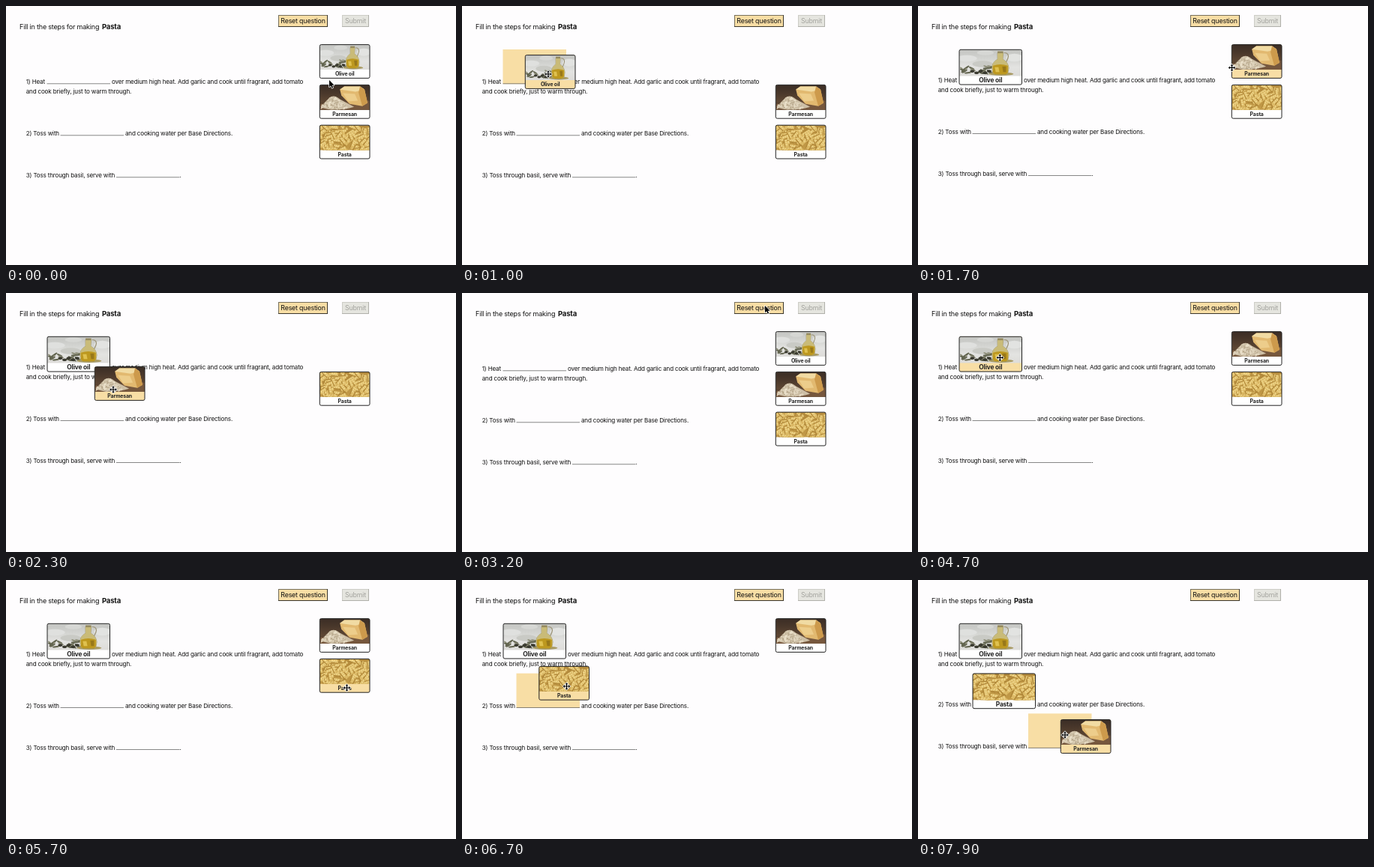
Recreate the animation shown at these times as an HTML page with a canvas. Size 600 by 346 pixels, loop 8000 ms.

```html
<!DOCTYPE html>
<html lang="en">
<head>
<meta charset="utf-8">
<title>Fill in the steps</title>
<style>
  html, body { margin: 0; width: 100%; height: 100%; overflow: hidden; background: #fefdfe; }
  canvas { display: block; width: 600px; height: 346px; }
</style>
</head>
<body>
<canvas></canvas>
<script>
const LOOP = 8000, STEP = 100;
const YELLOW = '#f8dea5', INK = '#111';
const CARD = { w: 66.7, h: 44.8 }, SLOT = { w: 84.5, h: 46.2 };
const FILL_SHIFT = 2.3; // a filled slot lifts its own text and everything below

const canvas = document.querySelector('canvas');
const ctx = canvas.getContext('2d');
const ratio = window.devicePixelRatio || 1;
canvas.width = 600 * ratio;
canvas.height = 346 * ratio;
ctx.scale(ratio, ratio);

const cards = [
  { name: 'Olive oil', paint: paintOil },
  { name: 'Parmesan', paint: paintCheese },
  { name: 'Pasta', paint: paintPasta },
];

const rows = [
  { before: '1) Heat', after: 'over medium high heat. Add garlic and cook until fragrant, add tomato',
    next: 'and cook briefly, just to warm through.', x: 54.5, afterX: 141, y: 104.2 },
  { before: '2) Toss with', after: 'and cooking water per Base Directions.', x: 72.5, afterX: 159, y: 173.2 },
  { before: '3) Toss through basil, serve with', after: '.', x: 147, afterX: 231.5, y: 229.2 },
];

const RESET = 3100;
const drags = [
  { card: 0, slot: 0, grab: 300, drop: 1200, end: RESET },
  { card: 1, slot: 1, grab: 1900, drop: 2500, end: RESET },
  { card: 0, slot: 0, grab: 3900, drop: 4600, end: LOOP },
  { card: 2, slot: 1, grab: 5900, drop: 6800, end: LOOP },
  { card: 1, slot: 2, grab: 7400, drop: LOOP, end: LOOP },
];

// Pointer path: time, x, y
const path = [
  [0, 431, 99], [100, 431, 99], [300, 449, 77], [1000, 115, 91], [1200, 113, 88],
  [1800, 443, 82], [1900, 443, 82], [2300, 143, 129], [2500, 120, 148],
  [2900, 404, 17], [3200, 404, 17], [3500, 414, 6], [3700, 414, 12],
  [3900, 433, 67], [4100, 208, 68], [4400, 98, 84], [4600, 97, 84],
  [5500, 455, 152], [5700, 454.5, 144], [5900, 455, 132], [6400, 132, 145],
  [6700, 139.5, 142], [6800, 139.5, 142], [7300, 424, 72], [7400, 424, 72],
  [7800, 198, 209], [7900, 196, 207], [8000, 196, 207],
];

function pointerAt(t) {
  const i = Math.max(1, path.findIndex(p => p[0] >= t));
  const [t0, x0, y0] = path[i - 1], [t1, x1, y1] = path[i];
  const k = (t - t0) / (t1 - t0), e = k * k * (3 - 2 * k);
  return { x: x0 + (x1 - x0) * e, y: y0 + (y1 - y0) * e };
}

const inside = (p, r) => p.x >= r.x && p.x <= r.x + r.w && p.y >= r.y && p.y <= r.y + r.h;

function text(str, x, y, size, { bold = false, color = INK, align = 'left' } = {}) {
  ctx.font = `${bold ? 700 : 400} ${size}px Inter, sans-serif`;
  ctx.letterSpacing = `${-0.02 * size}px`;
  ctx.fillStyle = color;
  ctx.textAlign = align;
  ctx.fillText(str, x, y);
}

function rect(x, y, w, h, color) {
  ctx.fillStyle = color;
  ctx.fillRect(x, y, w, h);
}

function ellipse(x, y, rx, ry, color, turn = 0) {
  ctx.fillStyle = color;
  ctx.beginPath();
  ctx.ellipse(x, y, rx, ry, turn, 0, 7);
  ctx.fill();
}

function shape(d, fill, stroke, width = 1) {
  const p = new Path2D(d);
  if (stroke) {
    ctx.strokeStyle = stroke;
    ctx.lineWidth = width;
    ctx.stroke(p);
  }
  if (fill) {
    ctx.fillStyle = fill;
    ctx.fill(p);
  }
}

function randomizer(seed) {
  return () => (seed = (seed * 16807) % 2147483647) / 2147483647;
}

function backdrop(...colors) {
  const g = ctx.createLinearGradient(0, 0, 0, 33);
  colors.forEach((c, i) => g.addColorStop(i / (colors.length - 1), c));
  rect(0, 0, 67, 34, g);
}

// Pictures are painted in a 67 by 33 box.
function paintOil() {
  backdrop('#c3c4c1', '#d2d3d0', '#e3e3e1', '#dddcd9');
  ellipse(8, 11, 11, 4, '#dfe0de');
  ellipse(28, 4, 9, 3, '#d6d7d4');
  ellipse(59, 10, 9, 5, '#e2e3e1');
  ellipse(25, 18, 11, 4, '#c9cac5');
  const rnd = randomizer(41);
  for (let i = 0; i < 26; i++) {
    const x = 3 + rnd() * 32, y = 21 + rnd() * 9;
    ellipse(x, y, 3.4, 1, i % 3 ? '#62644f' : '#8c8c77', rnd() * 2 - 1);
  }
  for (let i = 0; i < 5; i++) ellipse(14 + i * 4.5, 27 + i % 2 * 2, 2.4, 1.7, '#39392f');
  ellipse(45, 30.5, 13, 2, '#a89a62');
  shape('M48 4q6 0 4 7l-2 5', null, '#9a9274', 1);
  shape('M41 4h6l-.5 8q6 4 6.5 11l-1 6q-1 2-4 2h-8q-3 0-4-2l-1-6q0-7 6-11z', '#c9bb78', '#90834e', .6);
  shape('M36 20Q44 17 52 20L52 28q-1 3-4 3h-8q-3 0-4-3z', '#bd981f');
  shape('M38 22h4l1 6h-4z', '#dfc14f');
  shape('M46 21h4v7h-3z', '#98781a');
  rect(41, 2, 6, 2.5, '#958a60');
}

function paintCheese() {
  backdrop('#3a2d25', '#4a382b', '#5d4633', '#3c2c21');
  shape('M0 25L67 21V34H0z', '#76573d');
  shape('M27 6L33 2 54 2 60 6 64 24 57 28 40 25 29 14z', '#e2b970');
  shape('M27 6L33 2 54 2 60 6 48 9z', '#f1dba3');
  shape('M54 2L60 6 64 24 57 28 52 10z', '#cd9a4c');
  shape('M31 11L47 12 51 21 38 22z', '#edcd8b');
  shape('M2 30Q7 22 13 17Q19 12 27 19L46 29Q34 33 15 33z', '#cdbfa6');
  const rnd = randomizer(77);
  for (let i = 0; i < 110; i++) {
    const y = rnd() * 15, x = 19 + (rnd() - .5) * (8 + y * 2.3);
    ellipse(x, 17 + y, 1.7, .5, i % 3 ? '#ece2cc' : '#b3a386', rnd() * 3);
  }
}

function paintPasta() {
  backdrop('#b38a3c', '#c29a48');
  const rnd = randomizer(2024);
  for (let i = 0; i < 130; i++) {
    ctx.save();
    ctx.translate(rnd() * 67, rnd() * 34);
    ctx.rotate(rnd() * 3.14);
    shape('M-5 .5H5', null, '#ad8436', 4.2);
    shape('M-5 -.3H5', null, '#dfbd69', 3.6);
    shape('M-4 1l1-2.6M-1.3 1l1-2.6M1.4 1l1-2.6', null, '#f0d991', 1.2);
    ctx.restore();
  }
}

function drawCard(card, box, active, labelY, size) {
  const pictureH = box.h - 11.5;
  ctx.save();
  ctx.beginPath();
  ctx.roundRect(box.x, box.y, box.w, box.h, 2);
  ctx.fillStyle = active ? YELLOW : '#fff';
  ctx.fill();
  ctx.clip();
  ctx.beginPath();
  ctx.rect(box.x, box.y, box.w, pictureH);
  ctx.clip();
  ctx.translate(box.x, box.y);
  ctx.scale(box.w / 67, pictureH / 33);
  card.paint();
  ctx.restore();
  ctx.strokeStyle = '#222';
  ctx.lineWidth = 1;
  ctx.beginPath();
  ctx.roundRect(box.x, box.y, box.w, box.h, 2);
  ctx.stroke();
  text(card.name, box.x + box.w / 2, labelY, size, { bold: true, align: 'center', color: '#222' });
}

function drawButton(label, x, w, fill, light, dark, color) {
  rect(x, 12, w, 16, dark);
  rect(x, 12, w - 1, 15, light);
  rect(x + 1, 13, w - 2, 14, fill);
  text(label, x + w / 2, 23.1, 8.85, { align: 'center', color });
}

function drawPointer({ x, y }, moving) {
  ctx.save();
  ctx.translate(x, y);
  ctx.lineJoin = 'round';
  if (moving) {
    const cross = 'M0-4.8L1.9-2.7H.6V-.6H2.7V-1.9L4.8 0 2.7 1.9V.6H.6V2.7H1.9L0 4.8-1.9 2.7H-.6V.6H-2.7V1.9L-4.8 0-2.7-1.9V-.6H-.6V-2.7H-1.9z';
    shape(cross, '#000', '#fff', 1.4);
  } else {
    shape('M0 0V9.2L2.1 7.3 3.6 10.8 5.2 10.1 3.7 6.7H6.6z', '#000', '#fff', 1.4);
  }
  ctx.restore();
}

function draw(t) {
  const pointer = pointerAt(t);
  const placed = drags.filter(d => d.drop <= t && t < d.end);
  const held = drags.find(d => d.grab <= t && t < d.drop);
  let moving = Boolean(held);

  rect(0, 0, 600, 346, '#fefdfe');
  text('Fill in the steps for making', 18, 30.8, 9);
  text('Pasta', 128, 30.8, 9.5, { bold: true });
  drawButton('Reset question', 363, 66, YELLOW, '#77705c', '#3a362b', INK);
  drawButton('Submit', 448, 36, '#e5e5df', '#cdcdc6', '#b0b0aa', '#a3a39e');

  let shift = 0;
  const filled = [];
  rows.forEach((row, i) => {
    const drag = placed.find(d => d.slot === i);
    const slot = { x: row.x, y: row.y - SLOT.h - shift, ...SLOT };
    if (drag) {
      shift += FILL_SHIFT;
      const box = { x: slot.x + .5, y: slot.y + .3, w: slot.w - 1, h: 46.7 };
      filled.push({ card: cards[drag.card], box, labelY: row.y - shift });
    } else {
      const target = { ...slot, y: slot.y + 5, h: slot.h - 5 };
      if (held && inside(pointer, target)) rect(slot.x, slot.y, slot.w, slot.h, YELLOW);
      rect(slot.x, slot.y + slot.h - .7, slot.w, .7, '#555');
    }
    const y = row.y - shift;
    text(row.before, 26.7, y, 8.05);
    text(row.after, row.afterX, y, 8.05);
    if (row.next) text(row.next, 26.7, y + 12.7, 8.05);
  });

  for (const { card, box, labelY } of filled) {
    const hover = !held && inside(pointer, box);
    moving ||= hover;
    drawCard(card, box, hover, labelY, 8.4);
  }

  const waiting = cards.filter((_, i) => !placed.some(d => d.card === i));
  let heldBox;
  waiting.forEach((card, i) => {
    const box = { x: 418.3, y: 51.6 + i * 53.8, ...CARD };
    if (held && card === cards[held.card]) {
      const start = pointerAt(held.grab);
      heldBox = { ...box, x: box.x + pointer.x - start.x, y: box.y + pointer.y - start.y };
      return;
    }
    const hover = !held && inside(pointer, box);
    moving ||= hover;
    drawCard(card, box, hover, box.y + 41.8, 6.9);
  });
  if (heldBox) drawCard(cards[held.card], heldBox, true, heldBox.y + 41.8, 6.9);

  drawPointer(pointer, moving);
}

const start = performance.now();
function tick() {
  const t = (performance.now() - start) % LOOP;
  draw(Math.floor(t / STEP) * STEP);
  requestAnimationFrame(tick);
}
tick();
</script>
</body>
</html>
```
